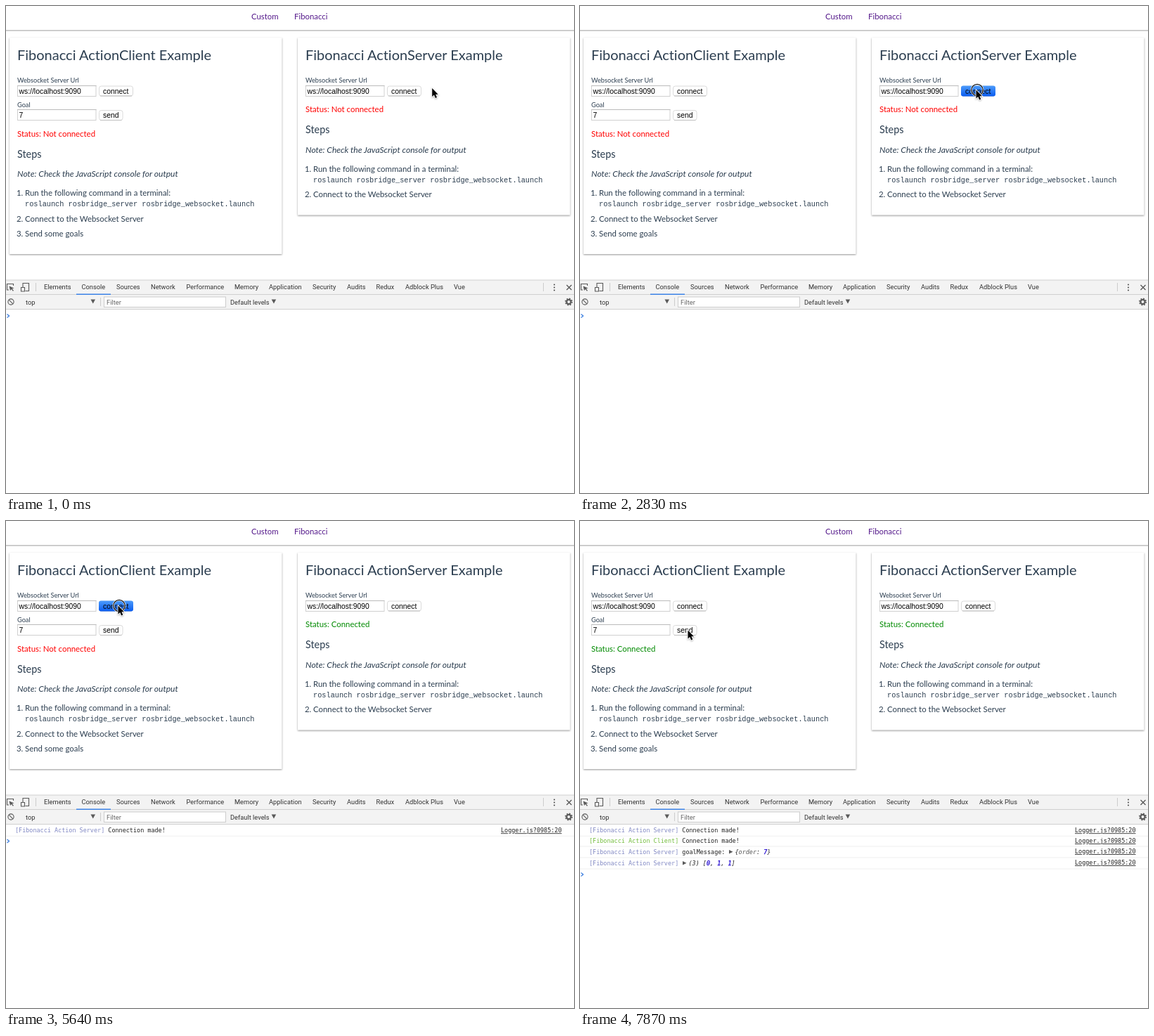
An HTML page for the animation above (8000 ms loop, 808 by 693 pixels).

```html
<!DOCTYPE html>
<html lang="en">
<head>
<meta charset="utf-8">
<title>Fibonacci action example</title>
<style>
  html, body { margin: 0; width: 100%; height: 100%; overflow: hidden; background: #fff; }
  svg { display: block; }
  text { white-space: pre; fill: #2c3e50; font: 11.4px Lato, sans-serif; font-variant-ligatures: none; }
  .title { font-size: 20px; }
  .label { font-size: 9.2px; }
  .steps { font-size: 14.4px; }
  .note { font-size: 12.1px; font-style: italic; }
  .link { fill: #551a8b; }
  .code { font: 10.28px "Liberation Mono", monospace; }
  .field { font: 10.4px "Liberation Sans", Arial, sans-serif; fill: #000; }
  .tool { font: 9.3px Roboto, sans-serif; fill: #333; }
  .log, .source { font: 8.46px "DejaVu Sans Mono", monospace; fill: #222; }
  .source { text-decoration: underline; }
  .bad { fill: #f00; }
  .good { fill: #008a00; }
  .card { fill: #fff; filter: drop-shadow(0 1px 1.2px rgba(0, 0, 0, .42)); }
  .line { fill: none; stroke: #5a5a5a; stroke-width: 1.1; }
  .solid { fill: #5a5a5a; }
</style>
</head>
<body>
<svg id="stage" width="808" height="693" viewBox="0 0 808 693">
  <defs>
    <linearGradient id="blue" x2="0" y2="1">
      <stop stop-color="#4c9bfb"/><stop offset="1" stop-color="#0a5cf0"/>
    </linearGradient>
  </defs>
</svg>
<script>
const LOOP = 8000;
const stage = document.getElementById('stage');
const timed = [];

function add(tag, attrs, content, parent = stage) {
  const el = document.createElementNS('http://www.w3.org/2000/svg', tag);
  for (const name in attrs) el.setAttribute(name, attrs[name]);
  if (content) el.innerHTML = content;
  return parent.appendChild(el);
}
const text = (x, y, cls, content) => add('text', { x, y, class: cls }, content);
const rect = (x, y, width, height, fill, more) => add('rect', { x, y, width, height, fill, ...more });
const path = (d, more) => add('path', { d, class: 'line', ...more });
const during = (from, to, ...els) => els.forEach(el => timed.push({ el, from, to }));

function input(x, y, w, h, value) {
  rect(x + .5, y + .5, w - 1, h - 1, '#fff', { stroke: '#d0d0d0' });
  rect(x, y, w, 1, '#bbb');
  text(x + 2.5, y + 11.5, 'field', value);
}

function button(x, y, w, label, press, release) {
  rect(x + .5, y + .5, w - 1, 14, '#fff', { rx: 3, stroke: '#dadada' });
  rect(x + 2, y + 14, w - 4, 1, '#c0c0c0');
  during(press, release, rect(x, y, w, 15, 'url(#blue)', { rx: 3 }));
  text(x + 6, y + 11, 'field', label);
}

// Lines below the form; y is the baseline of the status line.
function instructions(x, y, connected) {
  during(0, connected, text(x, y, 'bad', 'Status: Not connected'));
  during(connected, LOOP, text(x, y, 'good', 'Status: Connected'));
  text(x, y + 30, 'steps', 'Steps');
  text(x, y + 57.5, 'note', 'Note: Check the JavaScript console for output');
  text(x - 1, y + 84.5, '', '1.');
  text(x + 11, y + 84.5, '', 'Run the following command in a terminal:');
  text(x + 11, y + 99.5, 'code', 'roslaunch rosbridge_server rosbridge_websocket.launch');
  text(x - 1, y + 121, '', '2.');
  text(x + 11, y + 121, '', 'Connect to the Websocket Server');
}

function panel(x, height, name, press, release) {
  rect(x - 11, 45, 387.5, height, '#fff', { class: 'card' });
  text(x, 77, 'title', `Fibonacci Action${name} Example`);
  text(x, 109, 'label', 'Websocket Server Url');
  input(x, 113, 112.5, 16, 'ws://localhost:9090');
  button(x + 116, 113.5, 49, 'connect', press, release);
}

// Page
text(349, 19, 'link', 'Custom');
text(410, 19, 'link', 'Fibonacci');
rect(0, 34, 808, 1, '#c4c4c4');
rect(0, 35, 808, 1, '#d6d6d6');

panel(16, 308, 'Client', 5640, 5780);
text(16, 143.5, 'label', 'Goal');
input(16, 147, 112.5, 16, '7');
button(132, 148, 34.5, 'send', 7420, 7870);
instructions(16, 185.5, 5780);
text(15, 327.5, '', '3.');
text(27, 327.5, '', 'Send some goals');

panel(426, 252.5, 'Server', 2830, 2980);
instructions(426, 151, 2980);

// Developer tools
rect(0, 390, 808, 41, '#f3f3f3');
for (const y of [389.5, 410, 431]) rect(0, y, 808, 1, '#cfcfcf');
for (const [x, y] of [[42, 394], [764, 394], [134, 415]]) rect(x, y, 1, 12, '#ccc');
rect(100, 409.5, 49, 1.5, '#3b82e6');
Object.entries({
  Elements: 54, Console: 107.5, Sources: 157, Network: 206, Performance: 256.5, Memory: 325,
  Application: 374, Security: 436, Audits: 485, Redux: 526.5, 'Adblock Plus': 568, Vue: 637
}).forEach(([name, x]) => text(x, 403.3, 'tool', name));

path('M4 404H1.5V395.500H10.500V398');
path('M4.500 398.500L11.500 401.500L8.800 402.300L11 405L9.800 405.800L7.800 403L6 405Z', { class: 'solid' });
path('M24 400V394.500H32.500V405.500H27.500');
path('M21.500 400.500H26.500V406H21.500Z');
path('M797.500 397L804.500 404M804.500 397L797.500 404', { style: 'stroke-width:1.4' });
for (const cy of [396.5, 400.5, 404.5]) add('circle', { cx: 780, cy, r: 1.1, class: 'solid' });

add('circle', { cx: 7, cy: 421, r: 4.1, class: 'line' });
path('M4.200 418.200L9.800 423.800');
text(28, 424.5, 'tool', 'top');
rect(139.5, 414, 173, 14.5, '#fff', { stroke: '#ccc' });
text(143, 424.5, 'tool', 'Filter').style.fill = '#666';
text(319, 424.5, 'tool', 'Default levels');
for (const x of [120.5, 377.7]) path(`M${x} 417.500h6.500l-3.250 6Z`, { class: 'solid' });
add('circle', { cx: 800.5, cy: 421, r: 3.1, class: 'line', style: 'stroke-width:2.2' });
add('circle', { cx: 800.5, cy: 421, r: 4.7, class: 'line', style: 'stroke-width:1.6;stroke-dasharray:1.85' });

// Console output
const triangle = x => y => path(`M${x} ${y - 6}l5.500 2.800l-5.500 2.800Z`, { class: 'solid' });
const number = n => `<tspan fill="#1c00cf" stroke="#1c00cf" stroke-width=".25">${n}</tspan>`;
const italic = (x, content) => y => {
  const el = text(x, y, 'log', content);
  el.style.fontStyle = 'italic';
  return el;
};

function log(from, y, linkY, who, message, ...extras) {
  const color = who === 'Server' ? '#8289c4' : '#73bd3c';
  during(from, LOOP,
    text(13, y, 'log', `<tspan fill="${color}">[Fibonacci Action ${who}]</tspan> ${message}`),
    text(704, linkY, 'source', 'Logger.js?0985:20'),
    rect(0, y + 4.5, 808, 1, '#f0f0f0'),
    ...extras.map(make => make(y)));
}
log(2980, 443.3, 443.3, 'Server', 'Connection made!');
log(5780, 458, 458, 'Client', 'Connection made!');
log(7870, 474, 473, 'Server', 'goalMessage:', triangle(212),
  italic(220.5, `{<tspan fill="#565656">order</tspan>: ${number(7)}}`));
log(7870, 490, 489, 'Server', '', triangle(146),
  italic(154.5, `(3) [${[0, 1, 1].map(number).join(', ')}]`));

const prompt = path('M1.500 -2.500L4.500 0L1.500 2.500', { style: 'stroke:#3c7fe0;stroke-width:1.3' });

// Pointer: time, x, y, each held until the next
const moves = [
  [0, 606.2, 117], [150, 604, 119], [300, 592, 123], [450, 575, 125], [600, 565, 125.5], [750, 562.5, 125],
  [1050, 565, 126], [1195, 567, 123], [1340, 563.5, 120.5], [2390, 563.5, 119.5],
  [3720, 461, 118.5], [3867, 362, 118], [4014, 283, 120], [4161, 228, 123], [4308, 193, 125],
  [4455, 174, 125.5], [4602, 164, 124], [4750, 160.5, 122], [4900, 160, 121], [5040, 159.5, 120.5],
  [6230, 160, 126], [6377, 159, 138], [6525, 156, 149], [6672, 154, 154], [6820, 153.5, 155.5]
];
const pointer = add('g');
const ring = add('g', {},
  '<circle cx="1.500" r="8.200" fill="none" stroke="#fff" stroke-width="2.600"/>' +
  '<circle cx="1.500" r="8.200" fill="none" stroke="#111" stroke-width="1.300"/>', pointer);
during(2830, 2980, ring);
during(5640, 5780, ring);
during(7420, 7870, ring);
const arrow = add('path', {
  d: 'M0 0V12L2.700 9.500L4.700 14L6.800 13.100L4.900 8.700H8.500Z',
  stroke: '#fff', 'stroke-width': 1.6, 'paint-order': 'stroke',
  style: 'filter:drop-shadow(0 1px .8px rgba(0,0,0,.3))'
}, '', pointer);
const beam = add('path', {
  d: 'M-2.500 -6.500Q0 -6.500 0 -4.500Q0 -6.500 2.500 -6.500M0 -5V5M-2.500 6.500Q0 6.500 0 4.500Q0 6.500 2.500 6.500M-1.500 2.500H1.500',
  class: 'line', style: 'stroke:#111'
}, '', pointer);

const show = (el, on) => { el.style.display = on ? '' : 'none'; };
const inside = (x, from) => x > from && x < from + 112;

function render(now) {
  const t = now % LOOP;
  const visible = new Map();
  for (const { el, from, to } of timed) visible.set(el, visible.get(el) || (t >= from && t < to));
  visible.forEach((on, el) => show(el, on));

  const y = t < 2980 ? 441 : t < 5780 ? 455.5 : t < 7870 ? 470.2 : 503;
  prompt.setAttribute('transform', `translate(0 ${y})`);

  const [, px, py] = moves.filter(move => move[0] <= t).pop();
  const editing = py < 129 && (inside(px, 16) || inside(px, 426));
  pointer.setAttribute('transform', `translate(${px} ${py})`);
  show(beam, editing);
  show(arrow, !editing);
}

const start = performance.now();
function tick() {
  render(Math.max(0, performance.now() - start));
  requestAnimationFrame(tick);
}
tick();
</script>
</body>
</html>
```
